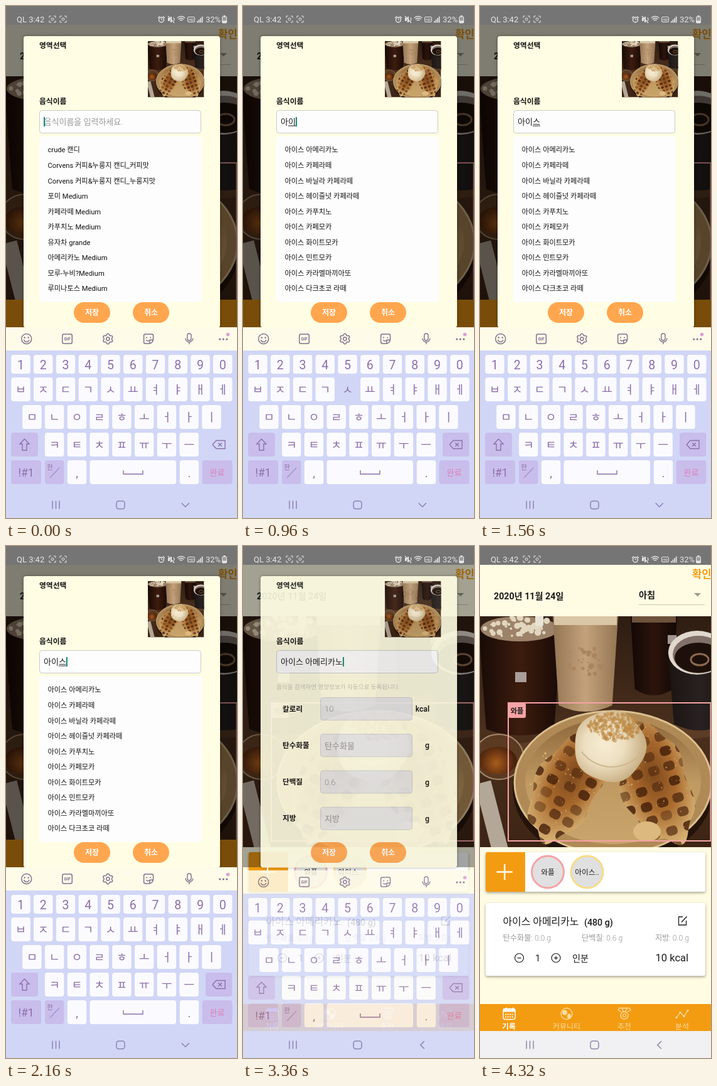
These frames come from a looping animation (368 px wide and 816 px high, 4.44 s). An HTML page with a canvas:

```html
<!DOCTYPE html>
<html lang="ko">
<head>
<meta charset="utf-8">
<title>음식 기록</title>
<style>
html, body { margin: 0; width: 100%; height: 100%; overflow: hidden; background: #fffce3; }
canvas { display: block; width: 368px; height: 816px; }
</style>
</head>
<body>
<canvas id="stage"></canvas>
<script>
const W = 368, H = 816, LOOP = 4440, STEP = 120;
const TYPING = 480, SELECT = 2400, CLOSING = 3360, CLOSED = 3480, BLINK = 720;
const FONT = 'Roboto, "Noto Sans CJK KR", "Noto Sans CJK", sans-serif';
const ORANGE = '#f39c12', PINK = '#f5a3a6', CREAM = '#fffde3', PURPLE = '#8c70a8', INK = '#1c1c1c';
const TAU = Math.PI * 2;

const dpr = window.devicePixelRatio || 1;
const stage = document.getElementById('stage');
const layer = document.createElement('canvas');
const [stageCtx, layerCtx] = [stage, layer].map(c => {
  c.width = W * dpr;
  c.height = H * dpr;
  const ctx = c.getContext('2d');
  ctx.scale(dpr, dpr);
  return ctx;
});
let g = stageCtx;

// ---------- helpers ----------
function paint(fill, stroke, lw = 1) {
  if (fill) { g.fillStyle = fill; g.fill(); }
  if (stroke) { g.strokeStyle = stroke; g.lineWidth = lw; g.stroke(); }
}

function rect(x, y, w, h, color) { g.fillStyle = color; g.fillRect(x, y, w, h); }

function box(x, y, w, h, r, ...style) {
  g.beginPath();
  g.roundRect(x, y, w, h, r);
  paint(...style);
}

function oval(x, y, rx, ry, ...style) {
  g.beginPath();
  g.ellipse(x, y, rx, ry, 0, 0, TAU);
  paint(...style);
}

function line(color, lw, ...p) {
  g.beginPath();
  for (let i = 0; i < p.length; i += 2) g.lineTo(p[i], p[i + 1]);
  paint(null, color, lw);
}

function arc(color, lw, x, y, r, a, b) {
  g.beginPath();
  g.arc(x, y, r, a, b);
  paint(null, color, lw);
}

// closed outline of radius r(angle)
function ring(x, y, r, ...style) {
  g.beginPath();
  for (let i = 0; i < 72; i++) {
    const a = i * TAU / 72;
    g.lineTo(x + r(a) * Math.sin(a), y - r(a) * Math.cos(a));
  }
  g.closePath();
  paint(...style);
}

function chevron(color, x, y, turn, s = 6) {
  at(x, y, turn, () => line(color, 1.6, -s, -s / 2, 0, s / 2, s, -s / 2));
}

function cross(color, lw, x, y, r, turn = 0) {
  at(x, y, turn, () => {
    line(color, lw, -r, 0, r, 0);
    line(color, lw, 0, -r, 0, r);
  });
}

function at(x, y, turn, draw) {
  g.save();
  g.translate(x, y);
  g.rotate(turn);
  draw();
  g.restore();
}

function shaded(blur, offset, draw) {
  g.save();
  g.shadowColor = 'rgba(0,0,0,.35)';
  g.shadowBlur = blur * dpr;
  g.shadowOffsetY = offset * dpr;
  draw();
  g.restore();
}

// y is the optical middle of the line
function text(s, x, y, size, color, weight = 400, align = 'left') {
  g.font = `${weight} ${size}px ${FONT}`;
  g.textAlign = align;
  g.fillStyle = color;
  g.fillText(s, x, y + size * 0.37);
  return g.measureText(s).width;
}

const label = (s, x, y, size, color, weight) => text(s, x, y, size, color, weight, 'center');

function stops(d, colors) {
  colors.forEach((c, i) => d.addColorStop(i / (colors.length - 1), c));
  return d;
}
const down = (y, h, ...colors) => stops(g.createLinearGradient(0, y, 0, y + h), colors);
const across = (x, w, ...colors) => stops(g.createLinearGradient(x, 0, x + w, 0), colors);
const glow = (x, y, r, ...colors) => stops(g.createRadialGradient(x, y, 0, x, y, r), colors);

function random(seed) {
  return () => (seed = seed * 16807 % 2147483647) / 2147483647;
}

function group(alpha, draw) {
  layerCtx.clearRect(0, 0, W, H);
  g = layerCtx;
  draw();
  g = stageCtx;
  g.globalAlpha = alpha;
  g.drawImage(layer, 0, 0, W, H);
  g.globalAlpha = 1;
}

// ---------- photo ----------
function speckle(n, x, y, rx, ry, color, seed, size = 1.2) {
  const rnd = random(seed);
  for (let i = 0; i < n; i++) {
    const a = rnd() * TAU, d = Math.sqrt(rnd()), r = size * (0.4 + rnd());
    oval(x + rx * d * Math.cos(a), y + ry * d * Math.sin(a), r, r, color);
  }
}

// tapered glass, w is half of the rim
function cup(x, top, bottom, w, edge, core) {
  const low = w * 0.82;
  g.beginPath();
  g.moveTo(x - w, top);
  g.lineTo(x + w, top);
  g.lineTo(x + low, bottom - 10);
  g.quadraticCurveTo(x, bottom + 10, x - low, bottom - 10);
  paint(across(x - w, 2 * w, edge, core, edge));
}

function waffle(x, y, rx, ry, turn, seed) {
  const rnd = random(seed);
  at(x, y, turn, () => {
    g.scale(rx / 100, ry / 100);
    ring(0, 0, a => 96 + 6 * Math.sin(a * 7) + 4 * Math.sin(a * 3), glow(0, -20, 120, '#7d481c', '#a8692d', '#d8b476'));
    g.clip();
    g.scale(100 / rx, 100 / ry);
    for (let i = -3; i < 4; i++) for (let j = -5; j < 6; j++) {
      g.globalAlpha = 0.35 + 0.5 * rnd();
      box(i * 27 - 9 + rnd() * 4, j * 25 - 8 + rnd() * 4, 18, 15, 6, '#45200a');
    }
    g.globalAlpha = 0.6;
    speckle(80, 0, 0, rx, ry, '#d8b780', seed + 5, 1);
  });
}

function photo(x, y, size) {
  g.save();
  g.translate(x, y);
  g.scale(size / W, size / W);
  g.beginPath();
  g.rect(0, 0, W, W);
  g.clip();
  rect(0, 0, W, W, down(0, W, '#2f1d12', '#4a2f1d', '#3d2414'));
  at(0, 210, -0.12, () => rect(0, 0, 400, 26, '#5c3c25'));

  cup(64, 20, 190, 66, '#170a06', '#3d1c0e');
  oval(63, 20, 62, 20, '#9b8268');
  speckle(50, 62, 17, 56, 16, '#e3d6bf', 17, 4);
  box(88, -8, 13, 24, 3, '#e9e2d5');
  box(56, 89, 18, 16, 0, '#a99f98');

  cup(168, 0, 152, 52, '#947553', '#c3a27b');
  rect(118, 0, 100, 14, '#d9c6a6');
  speckle(30, 168, 70, 34, 24, '#a98660', 3, 3);

  cup(277, 0, 126, 37, '#120806', '#2c140b');
  rect(242, 0, 70, 10, '#6d523c');
  box(299, 30, 14, 14, 0, '#a0968e');

  cup(350, 60, 182, 50, '#1a1412', '#282120');
  oval(346, 58, 46, 35, '#e0d8cd');
  oval(348, 61, 41, 30, '#81716a');
  oval(348, 66, 38, 24, '#1d100a');
  oval(350, 69, 14, 9, null, '#8c6a4e', 3);

  oval(30, 224, 39, 36, '#5b3a22', '#a58a6c', 2);
  oval(28, 230, 31, 22, glow(26, 234, 30, '#a85c1c', '#47200c'));
  at(-8, 268, -0.25, () => rect(0, 0, 26, 120, '#b3a797'));

  oval(212, 274, 160, 122, '#241309');
  oval(212, 265, 157, 114, '#b08a56', '#dcc08e', 3);
  oval(212, 263, 140, 100, down(163, 200, '#8d673b', '#bf9961', '#c9a56c'));
  speckle(60, 112, 270, 34, 60, '#dcbb85', 91);
  waffle(140, 270, 52, 98, 0.5, 7);
  waffle(281, 270, 56, 100, -0.3, 23);
  oval(266, 343, 22, 16, '#dcb97e');

  ring(207, 207, a => 57 + 1.5 * Math.sin(a * 5), glow(198, 205, 64, '#f7ecd3', '#eddfc1', '#c9b084'));
  speckle(260, 214, 176, 42, 22, 'rgba(190,139,70,.6)', 41, 2.4);
  arc('#cdb78f', 2, 210, 180, 60, 0.5, 2.5);
  g.restore();
}

// ---------- page ----------
function statusBar() {
  const c = '#e6e6e6';
  rect(0, 0, W, 30, '#757575');
  text('QL 3:42', 17, 21.5, 13, c);
  for (const x of [74, 91]) {
    for (let i = 0; i < 4; i++) at(x, 21, i * TAU / 4, () => line(c, 1, -5, -2, -5, -5, -2, -5));
    oval(x, 21, 2, 2, null, c);
  }
  oval(247.5, 22, 4, 4, null, c, 1.4);
  line(c, 1, 247.5, 19.5, 247.5, 22, 249.5, 22);
  for (const s of [-1, 1]) line(c, 1.3, 247.5 + s * 5.5, 19, 247.5 + s * 2.5, 16.5);
  rect(258, 19, 3, 5, c);
  line(c, 2, 263, 17, 263, 26);
  line(c, 1.2, 258, 16, 268, 27);
  arc(c, 1.2, 265, 21, 3, -1, 1);
  for (let r = 3; r < 10; r += 3) arc(c, 1.3, 279, 25.5, r, -2.35, -0.79);
  box(289.5, 17.5, 11, 8, 1.5, null, c);
  label('HD', 295, 21.5, 6, c, 500);
  for (let i = 0; i < 4; i++) rect(304 + i * 2.6, 24 - i * 2.4, 1.7, 2.5 + i * 2.4, c);
  text('32%', 318, 21.5, 13, c);
  box(344.5, 17, 7, 10, 1, '#9d9d9d', c);
  rect(346.5, 15, 3, 2, c);
  rect(345, 23.5, 6, 3.5, c);
}

const TABS = {
  기록(c) {
    box(-9, -8, 19, 17, 3, null, c, 1.4);
    rect(-9, -8, 19, 5, c);
    for (let i = 0; i < 8; i++) rect(-6 + (i % 4) * 3.6, (i >> 2) * 4, 2, 2, c);
    for (const x of [-5, 6]) rect(x, -10, 1.5, 4, c);
  },
  커뮤니티(c) {
    oval(0, 0, 9, 9, null, c, 1.3);
    oval(-3, -2, 4, 4, c);
    oval(4, 4, 3, 4, c);
  },
  추천(c) {
    line(c, 1.3, -5, -3, -10, -6, -8, -9, 8, -9, 10, -6, 5, -3);
    for (const s of [-1, 1]) line(c, 1.3, s * 4, -9, s, -3);
    oval(0, 2.5, 6, 6, null, c, 1.3);
    oval(0, 2.5, 2.5, 2.5, null, c, 1.2);
  },
  분석(c) {
    const dots = [6, -2, 4, -5].map((y, i) => [i * 6 - 9, y]);
    line(c, 1.2, ...dots.flat());
    for (const [x, y] of dots) oval(x, y, 1.7, 1.7, c);
  }
};

function tabBar(y) {
  rect(0, y, W, 44, ORANGE);
  Object.entries(TABS).forEach(([name, icon], i) => {
    const x = 46 + i * 92, c = i ? '#ffdca0' : '#fff';
    at(x, y + 15.5, 0, () => icon(c));
    label(name, x, y + 35.5, 11.9, c, i ? 300 : 700);
  });
}

function navBar(back, color) {
  for (let i = -1; i < 2; i++) line(color, 1.5, 79.5 + i * 5.5, 788.5, 79.5 + i * 5.5, 801.5);
  box(176, 789, 13, 12.5, 3.5, null, color, 1.5);
  chevron(color, 285.8, 795.2, back ? TAU / 4 : 0);
}

function card(y, h) {
  shaded(4, 2, () => box(9, y, 350, h, 3, '#fff'));
}

function page(squeezed) {
  rect(0, 0, W, H, '#fffce3');
  text('확인', 338, 44.5, 16.7, ORANGE, 700);
  text('2020년 11월 24일', 22, 79.5, 14.2, INK, 700);
  text('아침', 253, 77.5, 14.2, INK, 700);
  g.beginPath();
  for (const [dx, dy] of [[-5.5, 0], [5.5, 0], [0, 5.5]]) g.lineTo(346.5 + dx, 75 + dy);
  paint('#9b9a8c');
  rect(253, 93, 105, 1, '#c9c7b5');
  photo(0, 112, W);
  box(45, 250, 322.5, 220, 0, null, PINK, 2);
  box(45, 250, 28, 24, 3, PINK);
  label('와플', 59, 262.5, 11.2, INK, 700);

  card(488, 63);
  box(9, 488, 63, 63, [3, 0, 0, 3], ORANGE);
  cross('#fff', 2.4, 39.2, 519.5, 12.7);
  [['와플', PINK], ['아이스..', '#f7dc88']].forEach(([s, c], i) => {
    const x = 108 + i * 62.5;
    oval(x, 519.5, 25.5, 25.5, '#e0e0e0', c, 3);
    label(s, x, 519.5, 11.7, INK);
  });

  card(569, 116);
  text('아이스 아메리카노', 36.5, 598.5, 15.9, INK);
  text('(480 g)', 166, 599.5, 14.2, INK, 500);
  line(INK, 1.3, 323, 591, 316.5, 591, 316.5, 604, 328.5, 604, 328.5, 597);
  line(INK, 1.5, 321, 599.5, 329.5, 590.5);
  text('탄수화물: 0.0 g', 36.5, 624, 12.2, '#999', 300);
  text('단백질: 0.6 g', 162, 624, 12.2, '#999', 300);
  text('지방: 0.0 g', 333, 624, 12.2, '#999', 300, 'right');
  for (const x of [62.5, 121]) {
    oval(x, 656.5, 7, 7, null, INK, 1.2);
    rect(x - 3, 656, 6, 1.2, INK);
  }
  rect(120.4, 653.5, 1.2, 6, INK);
  label('1', 92, 656.5, 14.5, INK);
  text('인분', 147, 656.5, 14.2, INK);
  text('10 kcal', 332, 656, 16.5, INK, 400, 'right');
  tabBar(squeezed ? 468 : 730);
  rect(0, 773, W, 43, '#f1f0f2');
  navBar(true, '#8f86ad');
}

// ---------- dialog ----------
const MENU = ['crude 캔디', 'Corvens 커피&누룽지 캔디_커피맛', 'Corvens 커피&누룽지 캔디_누룽지맛', '포미 Medium',
  '카페라떼 Medium', '카푸치노 Medium', '유자차 grande', '아메리카노 Medium', '모루-누비?Medium', '루미나토스 Medium'];
const ICED = ['아메리카노', '카페라떼', '바닐라 카페라떼', '헤이즐넛 카페라떼', '카푸치노', '카페모카', '화이트모카',
  '민트모카', '카라멜마끼아또', '다크초코 라떼'].map(s => '아이스 ' + s);
const FIELDS = [['칼로리', '10', 'kcal'], ['탄수화물', '탄수화물', 'g'], ['단백질', '0.6', 'g'], ['지방', '지방', 'g']];
const STROKES = 'ㅇㅏㅇㅣㅅㅡ';
const COMPOSED = ['', 'ㅇ', '아', '앙', '아이', '아잇', '아이스'];

function inputState(t) {
  const beat = Math.floor((t - TYPING) / STEP);
  const count = Math.max(0, Math.min(beat, STROKES.length));
  const picked = t >= SELECT;
  const typedAt = count ? Math.min(t, TYPING + STROKES.length * STEP) : 0;
  return {
    picked,
    key: STROKES[beat],
    value: picked ? ICED[0] : COMPOSED[count],
    list: count < 2 ? MENU : ICED,
    cursor: (t - (picked ? SELECT : typedAt)) % BLINK < BLINK / 2
  };
}

function inputBox({ value, picked, cursor }) {
  box(53.5, 166.5, 257, 36, 4, '#fdfdfd', '#cbcbcb');
  let end = 60;
  if (value) {
    end += text(value, 60, 184, 13, INK);
    const w = g.measureText(value.slice(-1)).width;
    if (!picked) rect(end - w, 190.5, w, 1, INK);
  } else text('음식이름을 입력하세요.', 60.5, 184, 13, '#999', 300);
  if (cursor) rect(end, 177, 2, 15, '#0b8a7c');
}

function nutrients() {
  text('음식을 검색하면 영양정보가 자동으로 등록됩니다.', 53, 224.5, 9.6, '#c6c4b4', 300);
  FIELDS.forEach(([name, value, unit], i) => {
    const y = 259.6 + i * 58.2;
    text(name, 63, y, 11.6, '#111', 700);
    box(123.5, y - 18, 146, 36, 4, '#e8e8e8', '#d0d0d0');
    text(value, 130, y, 13, '#959595', 300);
    text(unit, 297, y, 12.2, '#111', 500, 'right');
  });
}

function dialog(state) {
  shaded(5, 0, () => box(28, 48, 313, 464.5, 4, CREAM));
  text('영역선택', 53, 62.5, 11.8, '#111', 700);
  photo(226, 56, 89.5);
  text('음식이름', 53, 152, 11.8, '#111', 700);
  inputBox(state);
  if (state.picked) nutrients();
  else {
    box(53, 208, 259, 264, 4, '#fdfdfd');
    state.list.forEach((s, i) => text(s, 66.5, 229.3 + i * 24.55, 11.2, '#111'));
  }
  ['저장', '취소'].forEach((s, i) => {
    const x = 108 + i * 94;
    box(x, 472, 58, 33, 16.5, '#ffa64f');
    label(s, x + 29, 488.5, 12, '#fff', 700);
  });
}

// ---------- keyboard ----------
const ROWS = ['1234567890', 'ㅂㅈㄷㄱㅅㅛㅕㅑㅐㅔ', 'ㅁㄴㅇㄹㅎㅗㅓㅏㅣ', 'ㅋㅌㅊㅍㅠㅜㅡ'];
const PITCH = 35.75, KEY_W = 30.4, KEY = '#fbfbff', FN = '#c9bdec';
const rowY = r => r ? 548 + r * 44 : 556;

const TOOLS = [
  c => {
    oval(0, 0, 8, 8, null, c, 1.5);
    for (const x of [-3, 3]) oval(x, -2, 1.2, 1.2, c);
    arc(c, 1.4, 0, 0.5, 4.3, 0.2, 2.94);
  },
  c => {
    box(-7.7, -7.5, 15.5, 15, 2.5, null, c, 1.5);
    label('GIF', 0, 0, 6.5, c, 700);
  },
  c => {
    ring(0, 0, a => 7.2 + 1.1 * Math.cos(a * 6), null, c, 1.5);
    oval(0, 0, 2.7, 2.7, null, c, 1.5);
  },
  c => {
    box(-7.5, -7.5, 15, 15, [2.5, 2.5, 7, 2.5], null, c, 1.5);
    line(c, 1.4, 7.5, 1.5, 2, 2, 1.5, 7.5);
    for (const x of [-3, 3]) oval(x, -2, 1, 1, c);
    arc(c, 1.3, -1, 0, 3.2, 0.5, 2.6);
  },
  c => {
    box(-3.1, -8.5, 6.2, 11, 3.1, null, c, 1.4);
    arc(c, 1.4, 0, -1, 6, 0, Math.PI);
    line(c, 1.4, 0, 5, 0, 8.5);
  },
  c => {
    for (const x of [-10, -4.5, 1]) oval(x, 0.5, 1.6, 1.6, c);
    oval(2.8, -7, 2.8, 2.8, '#dda0d6');
  }
];

function key(s, x, y, w, h, size, fill, color = PURPLE) {
  if (fill) box(x - w / 2, y, w, h, 4, fill);
  label(s, x, y + h / 2 + 0.5, size, color);
}

function keyboard(state, back, shift) {
  g.save();
  g.translate(0, shift);
  rect(0, 512, W, H - 512, '#d1d6f6');
  rect(0, 512, W, 37, '#fefbe8');
  TOOLS.forEach((tool, i) => at(32.7 + i * 64.8 - (i > 4 ? 6 : 0), 530.5, 0, () => tool('#80708f')));
  ROWS.forEach((row, r) => [...row].forEach((k, i) => {
    const x = 184.4 + (i - (row.length - 1) / 2) * PITCH;
    key(k, x, rowY(r), KEY_W, r ? 38 : 30, r ? 18.5 : 19.5, k === state.key ? null : KEY);
  }));

  const y = rowY(3), last = rowY(4);
  key('', 29.5, y, 43, 38, 1, FN);
  line(PURPLE, 1.4, 29.5, y + 10, 37, y + 18, 33, y + 18, 33, y + 28, 26, y + 28, 26, y + 18, 22, y + 18, 29.5, y + 10);
  key('', 339.2, y, 42.5, 38, 1, state.value && FN);
  line(PURPLE, 1.4, 329, y + 19, 335, y + 12.5, 349, y + 12.5, 349, y + 25.5, 335, y + 25.5, 329, y + 19);
  cross(PURPLE, 1.4, 341, y + 19, 4, TAU / 8);

  key('!#1', 32, last, 48, 38, 17.5, FN);
  key('', 77.2, last, KEY_W, 38, 1, FN);
  label('한', 70, last + 11, 10.5, PURPLE);
  line('#a48fc4', 1.2, 70, last + 28, 85, last + 12);
  key(',', 113, last, KEY_W, 38, 19, KEY);
  key('', 202.3, last, 137.5, 38, 1, KEY);
  line(PURPLE, 1.4, 187, last + 16, 187, last + 22, 218, last + 22, 218, last + 16);
  key('.', 292, last, KEY_W, 38, 19, KEY);
  key('완료', 336.5, last, 48, 38, 13, FN, '#d982b5');
  g.restore();
  navBar(back, '#8c82b6');
}

// ---------- timeline ----------
function draw(t) {
  const closing = t >= CLOSING;
  page(!closing);
  if (t < CLOSED) {
    const state = inputState(t);
    rect(0, 0, W, 512, `rgba(0,0,0,${closing ? 0.36 : 0.5})`);
    group(closing ? 0.9 : 1, () => dialog(state));
    group(closing ? 0.85 : 1, () => keyboard(state, closing, closing ? 5 : 0));
  }
  statusBar();
}

let shown = -1;
const start = performance.now();
function tick() {
  const t = Math.floor((performance.now() - start) % LOOP / STEP) * STEP;
  if (t !== shown) draw(shown = t);
  requestAnimationFrame(tick);
}
tick();
</script>
</body>
</html>
```
